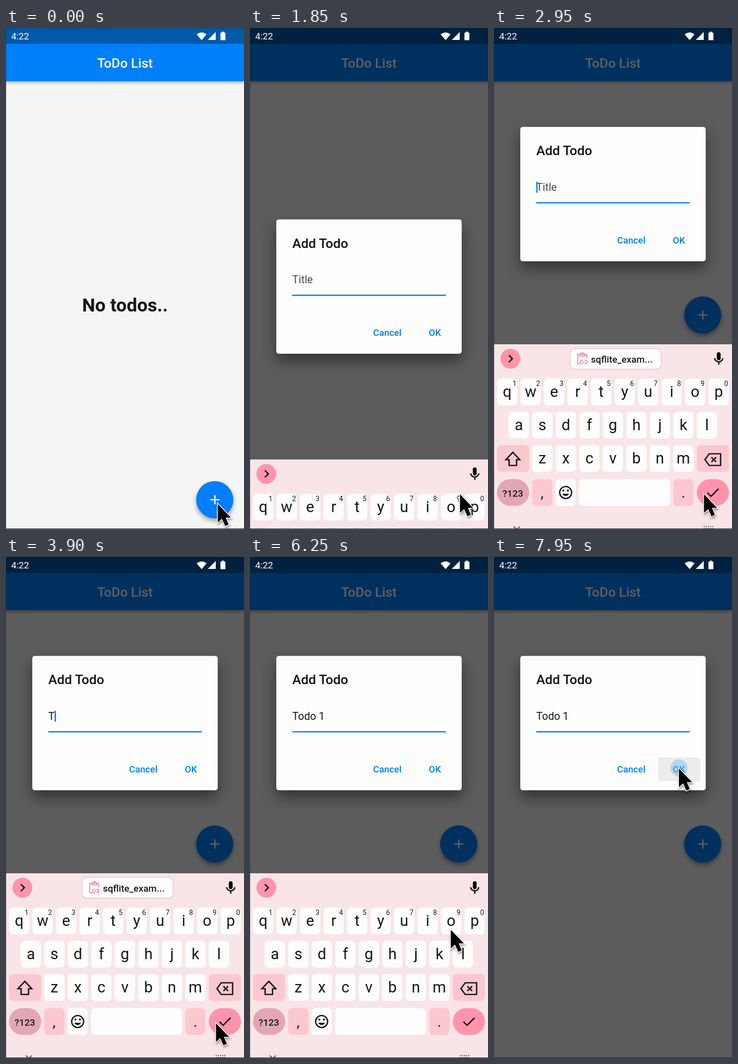
These frames come from a looping animation (480x1009 px, 8000 ms). An HTML page:

```html
<!DOCTYPE html>
<html lang="en">
<head>
<meta charset="utf-8">
<title>ToDo List</title>
<style>
  html, body { margin: 0; width: 100%; height: 100%; overflow: hidden; background: #f5f5f5; }
  svg { display: block; width: 100%; height: 100%; }
  text { font-family: Roboto, sans-serif; white-space: pre; }
  .mid { text-anchor: middle; }
  .medium { font-weight: 500; }
  .line { fill: none; stroke: #171314; stroke-width: 2.7; }
  .blue { fill: #007ffa; }
  #header { filter: drop-shadow(0 2px 3px rgba(0,0,0,.4)); }
  #fab > circle:first-child { filter: drop-shadow(0 5px 4px rgba(0,0,0,.35)); }
  #card { filter: drop-shadow(0 14px 14px rgba(0,0,0,.45)); }
  #mouse { filter: drop-shadow(1px 3px 2px rgba(0,0,0,.4)); }
</style>
</head>
<body>
<svg viewBox="0 0 480 1009">
  <rect width="480" height="1009" fill="#f5f5f5"/>
  <text id="empty" class="mid" x="240" y="571" font-size="37.33" font-weight="700" fill="#161616">No todos..</text>
  <rect id="header" class="blue" y="32" width="480" height="75"/>
  <rect width="480" height="32" fill="#0059a9"/>
  <text class="mid medium" x="240" y="80" font-size="26.67" fill="#fff">ToDo List</text>
  <g id="fab">
    <circle class="blue" cx="421" cy="950" r="37.5"/>
    <circle id="splash" cx="421" cy="950" r="0" fill="#fff"/>
    <path d="M412 950h18.5M421.2 940.7v18.5" stroke="#fff" stroke-width="2.6"/>
  </g>
  <rect id="scrim" width="480" height="1009" fill="#000" opacity=".625"/>

  <g fill="#fff">
    <text x="10.5" y="23" font-size="18.67">4:22</text>
    <path d="M384.500 12.800Q394.500 5 404.500 12.800L394.500 24.500Z"/>
    <path d="M423 8V24H407Z"/>
    <path d="M432.500 9.500H435V7.500H440V9.500H442.500V24.500H432.500Z"/>
  </g>

  <g id="dialog">
    <rect id="card" x="53" y="385.500" width="374" height="270.500" rx="5" fill="#fdfdfd"/>
    <text class="medium" x="85.300" y="442.500" font-size="26.67" fill="#111">Add Todo</text>
    <text id="field" x="85.300" y="514" font-size="21.33"></text>
    <rect id="caret" class="blue" y="496" width="2.7" height="22"/>
    <rect x="85.300" y="537.500" width="309.500" height="1.4" fill="#858585"/>
    <rect id="focusLine" class="blue" x="85.300" y="537" width="309.500" height="2.6"/>
    <rect id="hover" x="331" y="590" width="85" height="47.500" rx="5" fill="#ececec"/>
    <g class="blue medium" font-size="18.67">
      <text x="248.300" y="620.300">Cancel</text>
      <text x="360.500" y="620.300">OK</text>
    </g>
    <circle id="tap" cx="373" cy="611" r="17.300" fill="#69b4e6" opacity=".4"/>
  </g>

  <g id="keyboard">
    <rect y="637" width="480" height="372" fill="#f9e5e7"/>
    <circle cx="33" cy="666" r="20" fill="#ff94ab"/>
    <path class="line" d="M30 659l7 7-7 7"/>
    <rect x="449.500" y="653" width="7.500" height="16" rx="3.700"/>
    <path class="line" d="M445 665a8.300 8.300 0 0 0 16.500 0M453.300 673v5" stroke-width="2.2"/>
    <g id="chip">
      <rect x="153.500" y="645.500" width="183.500" height="41.500" rx="9" fill="#fdfdfd" stroke="#dcc9cc" stroke-width="1.4"/>
      <g fill="none" stroke="#f58ea3" stroke-width="2">
        <path d="M174 676h-5v-19h18v8M173 657v3.500h10V657M175 657a3 3 0 0 1 6 0"/>
        <path d="M179 676h-1a3.500 3.500 0 0 1 0-7h1M183 669h1a3.500 3.500 0 0 1 0 7h-1M179 672.500h4"/>
      </g>
      <text class="medium" x="195.500" y="673.500" font-size="19" fill="#191516">sqflite_exam...</text>
    </g>
    <g id="keys"></g>
    <path class="line" d="M38 854.500L52 869.500H45.500V881H30.500V869.500H24Z"/>
    <path class="line" d="M434 857.500H457V881H434L425.500 869.200ZM438.500 864.500l9.500 9.500m0-9.500l-9.500 9.500"/>
    <circle class="line" cx="144.500" cy="935.500" r="12"/>
    <path d="M138 938a7 7 0 0 0 13 0z"/>
    <circle cx="140" cy="931.500" r="2"/><circle cx="149" cy="931.500" r="2"/>
    <path class="line" d="M430.500 936l7.300 7.200L453 928"/>
    <path d="M40 1004l6 6 6-6" fill="none" stroke="#5c4f51" stroke-width="2"/>
    <path d="M423 1004h20M423 1008h20" stroke="#5c4f51" stroke-width="2" stroke-dasharray="2 2.300"/>
  </g>

  <path d="M0 1008.500H480" stroke="#222"/>
  <path d="M0 0V1009M0 0H480" stroke="#000" stroke-opacity=".4"/>
  <path id="mouse" d="M1.500 2.500V40L10 32.500 16.500 47 23.500 44 17.500 30H28Z" stroke="#fff" stroke-width="3" paint-order="stroke"/>
</svg>
<script>
const LOOP = 8000, PITCH = 47.4, FIELD_X = 85.3;
const OPEN = 950, KEYBOARD_IN = 1800, RESIZE = 2200, CHIP_IN = 2700;
const CLICK = 7300, KEYBOARD_OUT = 7450;
const TYPED = 'Todo 1', KEY_TIMES = [3800, 3950, 4100, 4400, 4600, 5450];
const WHITE = '#fdfdfd', PINK = '#fcc8d0';

const $ = id => document.getElementById(id);
const show = (id, on) => $(id).style.display = on ? '' : 'none';
const move = (id, x, y) => $(id).setAttribute('transform', `translate(${x} ${y})`);
const progress = (t, from, to) => Math.min(1, Math.max(0, (t - from) / (to - from)));
const easeOut = u => 1 - (1 - u) ** 3;
const easeInOut = u => u < .5 ? 4 * u ** 3 : 1 - 4 * (1 - u) ** 3;
const mix = (a, b, u) => a + (b - a) * u;

// Keyboard
const key = (x, y, w, fill = WHITE, rx = 8) =>
  `<rect x="${x}" y="${y}" width="${w}" height="54" rx="${rx}" fill="${fill}"/>`;
const label = (text, x, y, size, cls = '') =>
  `<text class="mid ${cls}" x="${x}" y="${y}" font-size="${size}" fill="#191516">${text}</text>`;
const row = (letters, x, y, digits = '') => [...letters].map((letter, i) => {
  const left = x + i * PITCH;
  return key(left, y, 41) + label(letter, left + 20.5, y + 37, 31) +
    (digits ? label(digits[i], left + 35.5, y + 15, 14) : '');
}).join('');
$('keys').innerHTML =
  row('qwertyuiop', 6, 706, '1234567890') + row('asdfghjkl', 29.7, 773) + row('zxcvbnm', 77, 840) +
  key(6, 840, 65, PINK) + key(409, 840, 65, PINK) +
  key(6, 908.5, 65, '#e3a7b4', 27) + key(77, 908.5, 41, PINK) + key(124, 908.5, 41) +
  key(171.5, 908.5, 183.5) + key(361.5, 908.5, 41, PINK) + key(409, 908.5, 65, '#ff94ab', 27) +
  label('?123', 38, 943.5, 19, 'medium') + label(',', 97, 945.5, 30) + label('.', 382, 945.5, 30);

const ruler = document.createElement('canvas').getContext('2d');
function textWidth(text) {
  ruler.font = '21.33px Roboto, sans-serif';
  return ruler.measureText(text).width;
}

function drawField(t) {
  const count = KEY_TIMES.filter(time => time <= t).length;
  const text = TYPED.slice(0, count);
  const field = $('field');
  field.textContent = text || 'Title';
  field.setAttribute('fill', text ? '#151515' : '#484848');
  // The blink restarts with each key.
  const blinkStart = count ? KEY_TIMES[count - 1] : 900;
  show('caret', t < 7400 && Math.floor((t - blinkStart) / 500) % 2 === 0);
  $('caret').setAttribute('x', FIELD_X + textWidth(text));
  $('focusLine').setAttribute('opacity', progress(t, 1000, 1250));
  show('chip', t >= CHIP_IN && count < TYPED.length);
}

function drawMouse(t) {
  const drift = easeInOut(progress(t, 1050, 1400));
  const toButton = easeInOut(progress(t, 5800, 6800));
  move('mouse', mix(mix(425.500, 422, drift), 371.5, toButton),
    mix(mix(956, 936.5, drift), 423.5, toButton));
}

function draw(t) {
  const open = t >= OPEN, resized = t >= RESIZE;
  const splash = progress(t, 250, 500);
  $('splash').setAttribute('r', 37.5 * splash);
  $('splash').setAttribute('opacity', .2 * Math.sin(Math.PI * splash));

  move('empty', 0, resized ? -186 : 0);
  move('fab', 0, resized ? -372 : 0);
  show('scrim', open);
  show('dialog', open);
  move('dialog', 0, -186.3 * easeOut(progress(t, RESIZE, RESIZE + 150)));
  drawField(t);
  show('hover', t >= 6850);
  show('tap', t >= CLICK);

  const rise = easeOut(progress(t, KEYBOARD_IN, KEYBOARD_IN + 350));
  const fall = progress(t, KEYBOARD_OUT, KEYBOARD_OUT + 200) ** 2;
  move('keyboard', 0, 372 * (1 - rise + fall));
  show('keyboard', rise > 0 && fall < 1);
  drawMouse(t);
}

const start = performance.now();
function frame(now) {
  draw(Math.max(0, now - start) % LOOP);
  requestAnimationFrame(frame);
}
draw(0);
requestAnimationFrame(frame);
</script>
</body>
</html>
```
